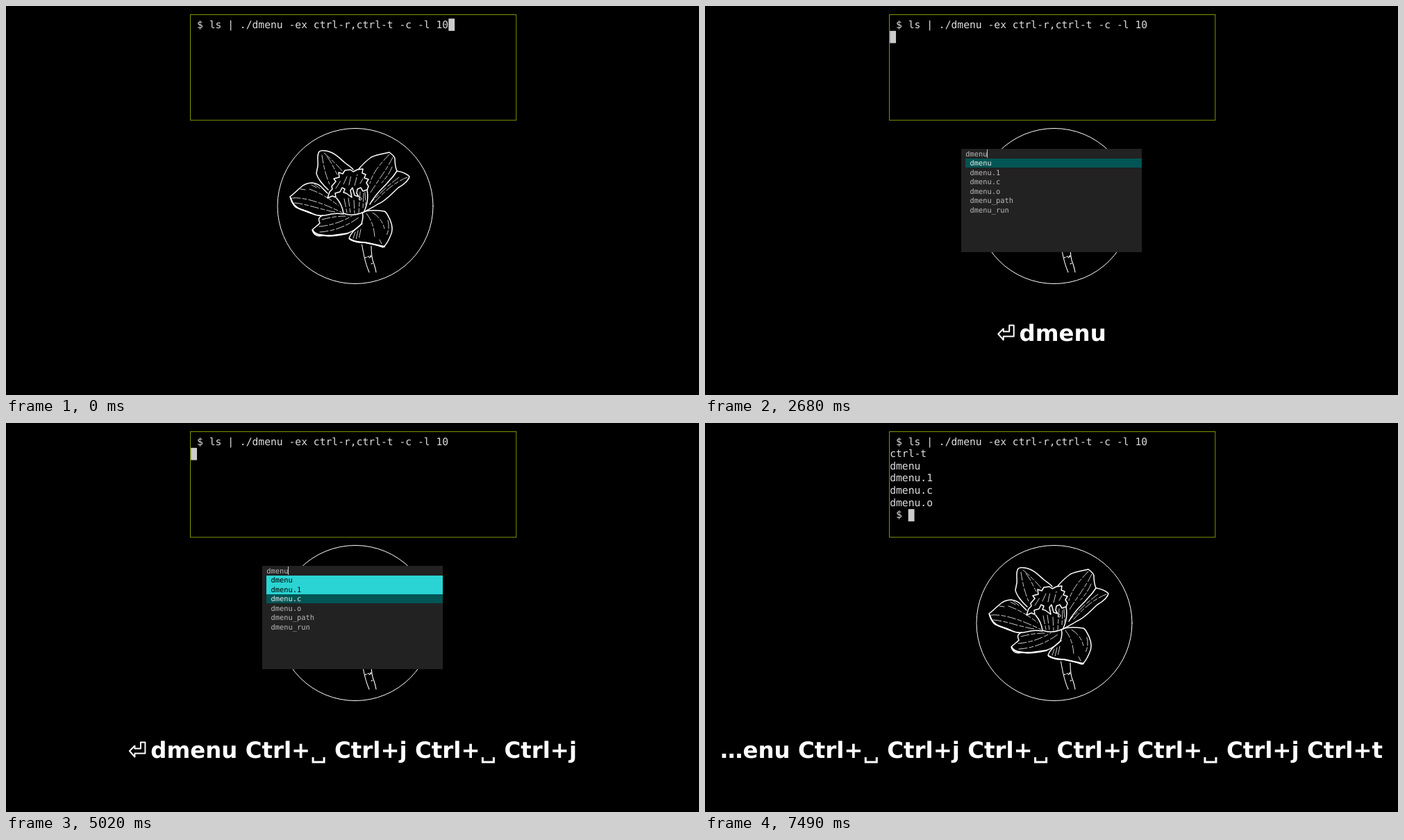
Write an HTML page that moves like this. It is 998 by 561 pixels and loops after 8 s.

```html
<!DOCTYPE html>
<html lang="en">
<head>
<meta charset="utf-8">
<title>Multi-select menu</title>
<style>
  html, body { margin: 0; width: 100%; height: 100%; overflow: hidden; background: #000; }
  svg { display: block; width: 998px; height: 561px; }
  text { white-space: pre; text-rendering: geometricPrecision; }
  .term { font: 14.68px "DejaVu Sans Mono", monospace; fill: #ddd; }
  .menu { font: 10.36px "DejaVu Sans Mono", monospace; fill: #bbb; }
  .menu rect { shape-rendering: crispEdges; }
  .menu .sel { fill: #eee; }
  .menu .out { fill: #000; }
  .keys { font: bold 32.43px "DejaVu Sans", sans-serif; fill: #fff; }
  .line { fill: none; stroke: #fff; stroke-linecap: round; stroke-linejoin: round; }
</style>
</head>
<body>
<svg viewBox="0 0 998 561">
  <rect width="998" height="561"/>
  <rect x="265.5" y="12.5" width="469.3" height="152.3" fill="none" stroke="#7f9400"/>
  <circle class="line" cx="503" cy="288.5" r="112"/>

  <g class="line" stroke-width="1.5">
    <!-- upper petals -->
    <path d="M464 265C455 257 448 247 447 241L449 231C450 224 447 216 451 210C455 207 462 209 468 211C476 214 482 221 488 226C493 230 497 232 500 236"/>
    <path d="M508 235C513 229 519 223 526 218C535 214 545 213 552 211C556 214 560 217 560 220C560 226 560 231 563 238C560 243 556 248 551 253C544 262 534 268 524 286"/>
    <path d="M563 238C570 239 577 242 581 246C579 253 572 258 565 262C555 271 546 282 535 286C528 291 522 293 516 297"/>
    <!-- lower petals -->
    <path d="M409 275C416 270 420 265 424 262C430 256 436 255 441 255C448 256 453 259 456 263L463 270M409 275C411 281 413 286 417 290C423 294 431 294 440 299C448 303 456 303 464 301C474 298 480 299 486 300"/>
    <path d="M456 302C449 305 450 309 452 313C449 317 444 319 441 323C443 330 448 333 456 331C468 333 480 331 491 328C500 325 507 320 512 314C514 308 515 303 513 298"/>
    <path d="M513 298C520 294 532 294 545 296C549 298 550 303 553 308C557 317 557 326 553 333C550 340 547 345 543 348C535 345 525 342 516 341C508 341 499 340 494 335C496 329 503 321 513 314"/>
    <path stroke-width="2.2" d="M410 277Q413 289 424 293L440 299M442 324Q446 332 470 331L492 328M495 336Q503 341 517 341L545 347"/>
    <!-- crown -->
    <path fill="#000" d="M463 277L466 268L470 264L469 260L475 253L472 249L480 247L479 240L485 242L488 237L496 236L500 239L506 236L514 235L513 241L518 243L516 248L522 250L519 255L522 260L520 265L514 267L511 262L506 264L505 270L508 275L502 273L499 262L496 266L498 276L490 270L486 269L488 264L484 262L481 268L474 270L475 276L470 274Z"/>
    <path d="M476 277C482 284 485 292 486 299Q499 304 513 298M520 265C522 276 520 288 515 298"/>
  </g>
  <g class="line" stroke-width=".8" stroke-dasharray="12 3 6 3">
    <!-- veins -->
    <path d="M458 212C470 222 481 234 486 240M455 215C457 230 461 246 466 257M462 217C470 227 473 236 477 243"/>
    <path d="M552 214C540 227 529 238 524 256M557 218C549 235 536 251 525 269M556 232Q552 243 541 255"/>
    <path d="M578 247C562 253 546 266 530 284M566 247Q548 260 527 282"/>
    <path d="M412 277C430 275 458 285 484 298M415 284C432 285 454 294 474 297M437 264Q459 272 479 288M440 258L447 262M444 257L452 263M424 264L431 265"/>
    <path d="M455 308Q473 303 489 303M451 318Q475 316 498 303M452 326Q482 324 508 305"/>
    <path d="M519 299Q530 313 531 334M528 298Q541 306 545 321M503 326L500 335M507 324L504 337M511 322L508 336M550 309Q553 320 548 331M538 337L541 343"/>
    <path d="M487 278L491 298M493 277L496 299M501 280L502 299M510 268L508 298M515 270L514 292M517 268L518 287"/>
    <path d="M475 263L482 252M486 257L491 246M494 258L497 244M502 259L506 243M510 256L514 249"/>
    <circle cx="510" cy="278" r="2"/>
  </g>
  <g class="line" stroke-width="1.1">
    <path d="M512.5 344C515 357 516 368 523 384M526 346C526 358 528 368 530 372Q532 378 533 384"/>
    <path stroke-dasharray="2 2" d="M517 363L526 360"/>
    <path d="M523 363L526 361M526 372L528 371"/>
  </g>

  <g id="term" class="term"></g>
  <g id="menu" class="menu"></g>
  <g id="keys" class="keys"></g>
</svg>

<script>
const LOOP = 8000;
const COL = 8.836, LINE = 17.66;    // terminal cell
const CHAR = 6.238, ROW = 13.506;   // menu cell
const BASE = 483;                   // baseline of the key display

const COMMAND = " $ ls | ./dmenu -ex ctrl-r,ctrl-t -c -l 10";
const OUTPUT = ["ctrl-t", "dmenu", "dmenu.1", "dmenu.c", "dmenu.o", " $"];
const CONFIG = ["arg.h", "config.def.h", "config.h", "config.mk"];
const MATCHES = ["dmenu", "dmenu.1", "dmenu.c", "dmenu.o", "dmenu_path", "dmenu_run"];
const DRAW = ["drw.c", "drw.h", "drw.o"];
const KEYS = ["⏎", ..."dmenu", ...Array(3).fill(["Ctrl+␣", "Ctrl+j"]).flat(), "Ctrl+t"];

// Each step changes part of the state and keeps the rest.
const steps = [
  [0, { keys: 0, under: false, shell: "typed", open: false, typed: 0, sel: 0 }],
  [500, { keys: 1, under: true, shell: "running" }],
  [590, { open: true }],
  [690, { under: false }],
  [1470, { keys: 2, under: true, typed: 1 }],
  [1660, { keys: 3, typed: 2 }],
  [1860, { keys: 4 }],
  [1920, { typed: 3 }],
  [2010, { keys: 5, typed: 4 }],
  [2200, { under: false }],
  [2490, { keys: 6, under: true }],
  [2580, { typed: 5 }],
  [2680, { under: false }],
  [3680, { keys: 7, under: true }],
  [3880, { under: false }],
  [4060, { keys: 8, under: true, sel: 1 }],
  [4250, { under: false }],
  [4450, { keys: 9, under: true }],
  [4640, { under: false }],
  [4840, { keys: 10, under: true }],
  [4930, { sel: 2 }],
  [5020, { under: false }],
  [5160, { keys: 11, under: true }],
  [5360, { under: false }],
  [5760, { keys: 12, under: true, sel: 3 }],
  [5950, { under: false }],
  [7310, { keys: 13, under: true }],
  [7400, { open: false, shell: "done" }],
  [7490, { under: false }],
];
let last = {};
const states = steps.map(([, change]) => last = { ...last, ...change });

const byId = id => document.getElementById(id);

function add(parent, tag, attrs, text = "") {
  const el = document.createElementNS("http://www.w3.org/2000/svg", tag);
  for (const name in attrs) el.setAttribute(name, attrs[name]);
  el.textContent = text;
  return parent.appendChild(el);
}

function box(parent, x, y, width, height, fill) {
  add(parent, "rect", { x, y, width, height, fill });
}

function drawTerm({ shell }) {
  const g = byId("term");
  g.replaceChildren();
  const lines = shell === "done" ? [COMMAND, ...OUTPUT] : [COMMAND];
  lines.forEach((line, i) => add(g, "text", { x: 266.2, y: 31.51 + i * LINE }, line));
  const [col, row] = { typed: [COMMAND.length, 0], running: [0, 1], done: [3, 6] }[shell];
  box(g, 266.2 + col * COL, 18.2 + row * LINE, COL, LINE, "#ccc");
}

function menuItems(typed) {
  if (typed === 0) return [...CONFIG, ...MATCHES];
  if (typed === 1) return [...MATCHES, ...DRAW, "config.def.h"];
  return MATCHES;
}

function drawMenu({ open, typed, sel }) {
  const g = byId("menu"), top = 206.2;
  g.replaceChildren();
  if (!open) return;
  box(g, 369, top, 260, 11 * ROW, "#222");
  add(g, "text", { x: 375.3, y: top + 10.4 }, "dmenu".slice(0, typed));
  box(g, 375.3 + typed * CHAR, top + 1.1, 1, ROW - 2.1, "#ccc");
  menuItems(typed).forEach((item, i) => {
    const y = top + (i + 1) * ROW;
    const kind = i < sel ? "out" : i === sel ? "sel" : "norm";
    if (i <= sel) box(g, 375.3, y, 253.7, ROW, i < sel ? "#2ad4d4" : "#005555");
    add(g, "text", { x: 381.5, y: y + 10.4, class: kind }, item);
  });
}

function drawEnter(g, alone) {
  add(g, "path", {
    class: "line",
    "stroke-width": alone ? 2.4 : 2,
    transform: `translate(0 ${alone ? 458 : 459})`,
    d: "M18 1.5H24.5V17.5H9.5V22.5L2 14L9.5 6.5V10.5H18Z",
  });
  return 26;
}

function drawKey(g, key, x, alone) {
  if (key === "⏎") return drawEnter(g, alone);
  const label = add(g, "text", { x, y: BASE }, key.replace("␣", ""));
  const width = label.getComputedTextLength();
  if (!key.endsWith("␣")) return width;
  add(g, "path", {
    class: "line",
    style: "stroke-width:3;stroke-linecap:butt;stroke-linejoin:miter",
    d: `M${x + width + 3.8} ${BASE - 1}v7h16v-7`,
  });
  return width + 23.5;
}

function drawKeys({ keys, under }) {
  const g = byId("keys");
  g.replaceChildren();
  const full = keys === KEYS.length;
  const list = full ? ["…enu", ...KEYS.slice(6)] : KEYS.slice(0, keys);
  let x = 0;
  list.forEach((key, i) => {
    if (i && key.length > 1) x += 11.29;
    if (list[i - 1] === "⏎") x += 6.3;
    const width = drawKey(g, key, x, keys === 1);
    if (under && i === list.length - 1) box(g, x, BASE + 0.4, width, 1.5, "#fff");
    x += width;
  });
  g.setAttribute("transform", `translate(${499 - x / 2} 0)`);
}

let shown = -1;
function tick() {
  const t = performance.now() % LOOP;
  const now = steps.findLastIndex(([start]) => start <= t);
  if (now !== shown) {
    shown = now;
    drawTerm(states[now]);
    drawMenu(states[now]);
    drawKeys(states[now]);
  }
  requestAnimationFrame(tick);
}
tick();
</script>
</body>
</html>
```
